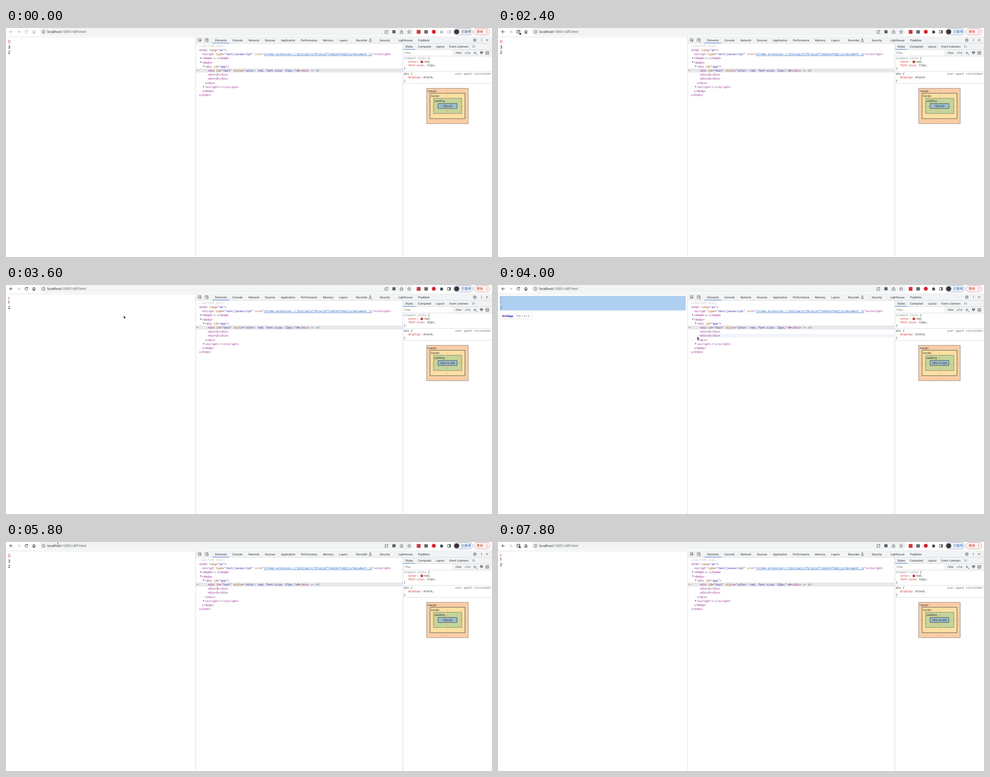
Write an HTML page that moves like this. It is 1088x515 px and loops after 8 s.

```html
<!DOCTYPE html>
<html lang="en">
<head>
<meta charset="utf-8">
<title>Inspector</title>
<style>
html, body { margin: 0; width: 100%; height: 100%; overflow: hidden; background: #fff; }
svg { display: block; }
text { font: 6.4px Roboto, sans-serif; fill: #303338; white-space: pre; text-rendering: geometricPrecision; }
.mono { font: 6.4px "DejaVu Sans Mono", monospace; fill: #222; }
.cjk { font: 7.4px "Noto Sans CJK SC", "Noto Sans CJK", sans-serif; }
.page { font: 8.8px Inter, sans-serif; fill: #111; }
.it { font-style: italic; }
.mid { text-anchor: middle; }
.end { text-anchor: end; }
.tag { fill: #881280; }
.attr { fill: #994500; }
.val { fill: #1a1aa6; }
.link { fill: #1558c0; text-decoration: underline; }
.prop { fill: #c8201a; }
.dim { fill: #808488; }
.pale { fill: #c0c0c0; }
.ico { fill: none; stroke: #54585d; stroke-width: .9; }
</style>
</head>
<body>
<svg width="1088" height="515" viewBox="0 0 1088 515">
  <g id="base"></g>
  <g id="live"></g>
  <g id="mouse"></g>
</svg>
<script>
const $ = id => document.getElementById(id);
const LOOP = 8000, CHAR = 3.853;
const RED = '#d32a1c', BAR = '#f1f3f4', LINE = '#cbcdd1';

// y is the vertical middle of the line
const text = (x, y, s, cls = '', more = '') =>
  `<text x="${x}" y="${y + 2.25}" class="${cls}" ${more}>${s}</text>`;
const rect = (x, y, w, h, fill, more = '') =>
  `<rect x="${x}" y="${y}" width="${w}" height="${h}" fill="${fill}" ${more}/>`;
const icon = (d, more = '') => `<path class="ico" d="${d}" ${more}/>`;
const dot = (x, y, r, fill) => `<circle cx="${x}" cy="${y}" r="${r}" fill="${fill}"/>`;
const dots = (x, y, dx, dy, r = .75) =>
  [-1, 0, 1].map(i => dot(x + i * dx, y + i * dy, r, '#54585d')).join('');
const span = (cls, s) => `<tspan class="${cls}">${s.replace(/</g, '&lt;')}</tspan>`;
const tag = s => span('tag', s);
const attr = (name, value, cls = 'val') =>
  span('attr', ` ${name}`) + tag('="') + span(cls, value) + tag('"');
const rowY = i => 40.5 + 9.2 * i;

function base() {
  let s = rect(0, 0, 1088, 20, '#fff') + rect(75, -1, 838, 18.5, BAR, 'rx="9"');
  s += rect(0, 19.7, 1088, .7, LINE);
  s += '<circle class="ico" cx="84" cy="8.5" r="3.4"/>' + icon('M84 8v2.4M84 6.4v.9');
  s += text(92.5, 8.5, 'localhost<tspan fill="#5f6368">:10001/diff.html</tspan>', '', 'style="font-size:7.65px"');
  s += icon('M851 6h-2.5v6h6V9.5M852 5.5h2.8v2.8M854.5 5.8l-3.5 3.5');
  s += rect(865, 5, 7, 7, '#5f6368');
  s += icon('M883.8 7.5h-1.3v4.5h6V7.5h-1.3M885.5 10V5M883.8 6.4l1.7-1.7 1.7 1.7');
  s += icon('M902.5 4.8l1.1 2.5 2.7.3-2 1.8.6 2.7-2.4-1.4-2.4 1.4.6-2.7-2-1.8 2.7-.3z');
  s += rect(919.5, 4.5, 8.5, 8.5, '#d2373f') + rect(936.5, 5, 8, 7.5, '#66696d') + dot(957.7, 8.5, 4.4, '#d8212b');
  s += rect(1002, 1.3, 42.5, 14.4, '#f0f5fd', 'rx="7.2" stroke="#7f93ad" stroke-width=".8"') + dot(1009, 8.5, 5.6, '#3e3434');
  s += rect(1047.7, 1.3, 35.6, 14.4, '#fdf3f2', 'rx="7.2" stroke="#c98b85" stroke-width=".8"');
  s += text(1053.5, 8.7, '更新', 'cjk', 'style="fill:#c5352b"');
  s += [-2.8, 0, 2.8].map(d => dot(1076.3, 8.5 + d, .8, '#c5352b')).join('');

  s += rect(425, 20.4, 663, 13.9, BAR) + rect(889, 34.3, 199, 14, BAR) + rect(889, 48.5, 199, 14.5, BAR);
  s += rect(889, 49, 110, 13.5, '#fff');
  s += rect(424.3, 20, .8, 495, LINE) + rect(888.2, 34, .8, 481, LINE);
  s += rect(425, 34, 663, .7, LINE) + rect(889, 48.2, 199, .7, LINE) + rect(889, 62.8, 199, .7, LINE);
  s += rect(462, 33.3, 38, 1.1, '#4c7fd0') + rect(889, 47.6, 27, 1.1, '#4c7fd0');
  s += icon('M436.5 26.5v-2.5h-6v6h2.5M433 26.5l4 1.5-1.8.7-.7 1.8zM435 28.5l2 2');
  s += icon('M447 30h-2M446 29v-5h6v1.5M449.5 26h3v5h-3z');
  const tabs = [468, 'Elements', 506.5, 'Console', 543, 'Network', 579.5, 'Sources', 615.5, 'Application',
    660, 'Performance', 709.5, 'Memory', 746, 'Layers', 783.5, 'Recorder', 836.5, 'Security',
    878.5, 'Lighthouse', 922.5, 'PopMute'];
  for (let i = 0; i < tabs.length; i += 2) s += text(tabs[i], 27.3, tabs[i + 1]);
  s += icon('M814.3 24.2h2.6M814.8 24.2v2.3l-2 3.8h5.6l-2-3.8v-2.3');
  s += '<circle class="ico" cx="1049.5" cy="27.3" r="2.7"/><circle class="ico" cx="1049.5" cy="27.3" r="3.5" stroke-dasharray="1.3 1.45"/>' + dot(1049.5, 27.3, 1, '#54585d');
  s += dots(1064.6, 27.3, 0, 2.3) + icon('M1074.8 25l4.6 4.6M1079.4 25l-4.6 4.6');
  s += text(894, 41.7, 'Styles') + text(922, 41.7, 'Computed') + text(962.5, 41.7, 'Layout') + text(992.2, 41.7, 'Event Listeners');
  s += icon('M1043.5 39.2l2.5 2.5-2.5 2.5M1047 39.2l2.5 2.5-2.5 2.5');
  s += text(892, 56, 'Filter', '', 'style="fill:#75797e"') + text(1004.5, 56, ':hov', 'mono') + text(1024.5, 56, '.cls', 'mono');
  s += icon('M1049.7 52.8v6.4M1046.5 56h6.4') + '<path d="M1052 60.2h2.4v-2.4z" fill="#54585d"/>';
  s += icon('M1062 53h5v3.4h-5zM1062 55h5M1064.5 56.4v3', 'style="stroke-width:1.1"');
  s += icon('M1074 53h6.5v6h-6.5zM1078.5 53v6M1077 54.5l-1.6 1.5 1.6 1.5');
  return s;
}

function toolbar(active, hover) {
  const on = active ? '#44474b' : '#b9bcc0', off = '#bfc2c6';
  const nav = (d, color) => icon(d, `style="stroke:${color};stroke-width:1.05"`);
  return (hover ? dot(45.7, 8.5, 6.8, '#e9eaec') : '') +
    nav('M15 8.5H8.6M11.6 5.3L8.4 8.5l3.2 3.2', on) +
    nav('M25.2 8.5h6.4M28.6 5.3l3.2 3.2-3.2 3.2', off) +
    nav('M48.4 10.1a3.1 3.1 0 1 1-.4-3.8M48.7 5v2.4h-2.4', on) +
    nav('M59.2 8.6l3.3-3.3 3.3 3.3M60.2 8v3.9h1.6V9.8h1.4v2.1h1.6V8', on) +
    `<path d="M972 6.3h1.8a1.1 1.1 0 0 1 2.2 0h1.8v1.9a1.1 1.1 0 0 1 0 2.2v1.9h-2a1.1 1.1 0 0 0-2 0h-1.8v-2a1.1 1.1 0 0 0 0-2z" fill="${on}"/>` +
    nav('M988.8 5.5h6.2v6.2h-6.2z', on) + rect(992.4, 5.5, 2.7, 6.2, on) +
    text(1019, 8.7, '已暂停', 'cjk', `style="fill:${active ? '#1f5caf' : '#3c4650'}"`);
}

function page(big) {
  const line = big ? 24 : 16.5, y = 24.5 + line * .531;
  const digit = (yy, s, more = '') => text(4.3, yy + .8, s, 'page', more);
  return digit(24.5 + line * .2655, 0, `style="fill:${RED};font-size:${big ? 9.2 : 6.4}px"`) +
    digit(y + 6, big ? 3 : 1) + digit(y + 18, 2);
}

function overlay(big) {
  const h = (big ? 69 : 61.5) * .531, top = 24.5 + h + 5.5, w = big ? 67 : 72;
  return rect(4.2, 24.5, 416, h, 'rgba(134,184,232,.66)') +
    rect(3.4, top - .2, w + 1.2, 14.4, '#000', 'rx="2" opacity=".13"') +
    rect(4, top, w, 13, '#fff', 'rx="1.5"') +
    `<path d="M10.5 ${top + .2}l4-4 4 4z" fill="#fff"/>` +
    text(9, top + 6.6, span('tag', 'div') + span('val', '#app'), '', 'style="font-weight:700;font-size:6.9px"') +
    text(40, top + 6.6, `783 × ${big ? 69 : 61.5}`, 'dim', 'style="font-size:6.5px"');
}

function tree(big, hoverRow, flash) {
  const row = (i, x, s) => text(x, rowY(i), s, 'mono');
  const arrow = (x, i, open) => {
    const y = rowY(i) - .5;
    return `<path d="M${open ? `${x - 2} ${y - 1.2}h4l-2 3` : `${x - 1.2} ${y - 2}v4l3-2`}z" fill="#666a6f"/>`;
  };
  const folded = (x, i) => rect(x, rowY(i) - 2.1, 7, 4.6, '#e4e5e8', 'rx="2"') + dots(x + 3.5, rowY(i) + .2, 1.6, 0, .45);
  const plain = n => tag('<div>') + n + tag('</div>');
  let s = rect(425.2, 91, 463, 9.2, '#e7e8ea') + dots(428.8, 95.4, 1.9, 0, .6);
  if (hoverRow) s += rect(447, rowY(hoverRow) - 4.3, 440, 8.8, '#f1f5fb', 'rx="2"');
  s += row(0, 432, span('pale', '<!DOCTYPE html>')) +
    row(1, 432, tag('<html') + attr('lang', 'en') + tag('>')) +
    row(2, 438.5, tag('<script') + attr('type', 'text/javascript') +
      attr('src', 'chrome-extension://jbikjaejnjfbloojafllmdiknfndgljo/document.js', 'link') + tag('><\/script>')) +
    arrow(436, 3) + row(3, 439.3, tag('<head>')) + folded(463.5, 3) + row(3, 472, tag('</head>')) +
    arrow(436, 4, true) + row(4, 439.3, tag('<body>')) +
    arrow(442.5, 5, true) + row(5, 445.8, tag('<div') + attr('id', 'app') + tag('>')) +
    row(6, 451.5, tag('<div') + attr('id', 'test') + attr('style', `color: red; font-size: ${big ? 17 : 12}px;`) +
      tag('>') + 0 + tag('</div>') + span('dim', ' == ') + '<tspan class="dim it">$0</tspan>') +
    row(7, 451.5, plain(big ? 3 : 1)) + row(8, 451.5, plain(2)) + row(9, 445.2, tag('</div>')) +
    arrow(442.5, 10) + row(10, 446, tag('<script>')) + folded(478, 10) + row(10, 486, tag('<\/script>')) +
    row(11, 438.5, tag('</body>')) + row(12, 432, tag('</html>'));
  if (flash > 0) {
    const mark = (i, col, n) => rect(451.5 + col * CHAR, rowY(i) - 3.3, n * CHAR, 7.2, '#9a58a4', `opacity="${flash}"`);
    s += mark(6, 22, 28) + mark(7, 1, 3) + mark(7, 5, 1);
  }
  return s;
}

function styles(big) {
  const code = (x, y, s, cls = '') => text(x, y, s, 'mono ' + cls);
  const box = (x, y, w, h, fill, dash) =>
    rect(x, y, w, h, fill, `stroke="#333" stroke-width=".8" ${dash ? 'stroke-dasharray="2 1.2"' : ''}`);
  const prop = (name, rest) => span('prop', name) + ':' + rest;
  let s = code(890.8, 68, span('dim', 'element.style') + ' {') +
    code(900.2, 76.2, prop('color', '')) + rect(928.3, 73.8, 5, 5, RED, 'stroke="#999" stroke-width=".3"') + code(935, 76.2, 'red;') +
    code(900.2, 84.2, prop('font-size', ` ${big ? 17 : 12}px;`)) + code(890.8, 91.2, '}') +
    rect(889, 97, 199, .7, LINE) + code(890.8, 102.6, 'div {', 'it') +
    text(1086.3, 102.6, 'user agent stylesheet', 'mono it end', 'style="fill:#65696e"') +
    code(900.2, 111, prop('display', ' block;'), 'it') + code(890.8, 118.5, '}', 'it') + rect(889, 124.3, 199, .7, LINE);
  s += box(941.7, 135.6, 93.2, 79.6, '#f9cda6', true) + box(949.3, 146.9, 78.3, 57, '#fce0a2') +
    box(957, 158, 63.3, 34.3, '#c6d49a', true) + box(967.3, 169.8, 42.2, 11.2, '#9abccb');
  s += text(944, 141.3, 'margin') + text(951.8, 153, 'border') + text(959.3, 164.2, 'padding');
  for (const y of [141.3, 153, 164.2, 187, 198.5, 210]) s += text(988.3, y, '-', 'mid');
  for (const x of [946, 954, 964.5, 1012.2, 1022.7, 1030.5]) s += text(x, 175.8, '-', 'mid');
  return s + text(988.3, 175.6, big ? '783×24' : '783×16.500', 'mid');
}

// time, x, y of the pointer
const PATH = [
  [400, 300, 428], [700, 150, 190], [1000, 76, 48], [1100, 65, 26], [1200, 51, 8], [1500, 51, 8],
  [1900, 48, 9], [3200, 48, 8.7], [3400, 90, 22], [3700, 350, 92], [3900, 440, 113], [4000, 446, 116],
  [4200, 447, 123.5], [5100, 447, 123.5], [5400, 400, 92], [5800, 116, 1], [6000, 98, -12],
  [6700, 82, -10], [6900, 47, 7], [8000, 47, 7]
];

function pointer(t) {
  const i = PATH.findIndex(p => p[0] > t);
  if (i < 1) return null;
  const [t0, x0, y0] = PATH[i - 1], [t1, x1, y1] = PATH[i], k = (t - t0) / (t1 - t0);
  return [x0 + (x1 - x0) * k, y0 + (y1 - y0) * k];
}

const ARROW = '<path d="M0 0v7.2l1.7-1.5 1.1 2.5 1.2-.5-1.1-2.5h2.2z" fill="#111" stroke="#fff" stroke-width=".6"/>';
const BEAM = '<path d="M-1.6-4q1.6 0 1.6 1 0-1 1.6-1M0-3v6M-1.6 4q1.6 0 1.6-1 0 1 1.6 1" fill="none" stroke="#333" stroke-width=".8"/>';

const within = (t, a, b) => t >= a && t < b;
let last = '';

function frame(now) {
  const t = Math.floor(now % LOOP / 100) * 100;
  const big = t < 3300 || within(t, 4700, 7100);
  const loading = within(t, 3300, 3500) || within(t, 7100, 7300);
  const spot = pointer(t);
  const hover = spot && Math.hypot(spot[0] - 45.7, spot[1] - 8.5) < 7;
  const inspect = within(t, 3900, 5400);
  const hoverRow = inspect && (t < 4100 ? 8 : 9);
  const flash = within(t, 4700, 5700) ? 1 - (t - 4700) / 1000 : 0;
  const html = toolbar(t >= 2100, hover) + page(big) + (inspect ? overlay(big) : '') +
    (loading ? '' : tree(big, hoverRow, flash) + styles(big));
  if (html !== last) $('live').innerHTML = last = html;
  $('mouse').innerHTML = spot
    ? `<g transform="translate(${spot})">${spot[0] > 75 && spot[1] < 18 ? BEAM : ARROW}</g>` : '';
  requestAnimationFrame(frame);
}

$('base').innerHTML = base();
frame(performance.now());
</script>
</body>
</html>
```
